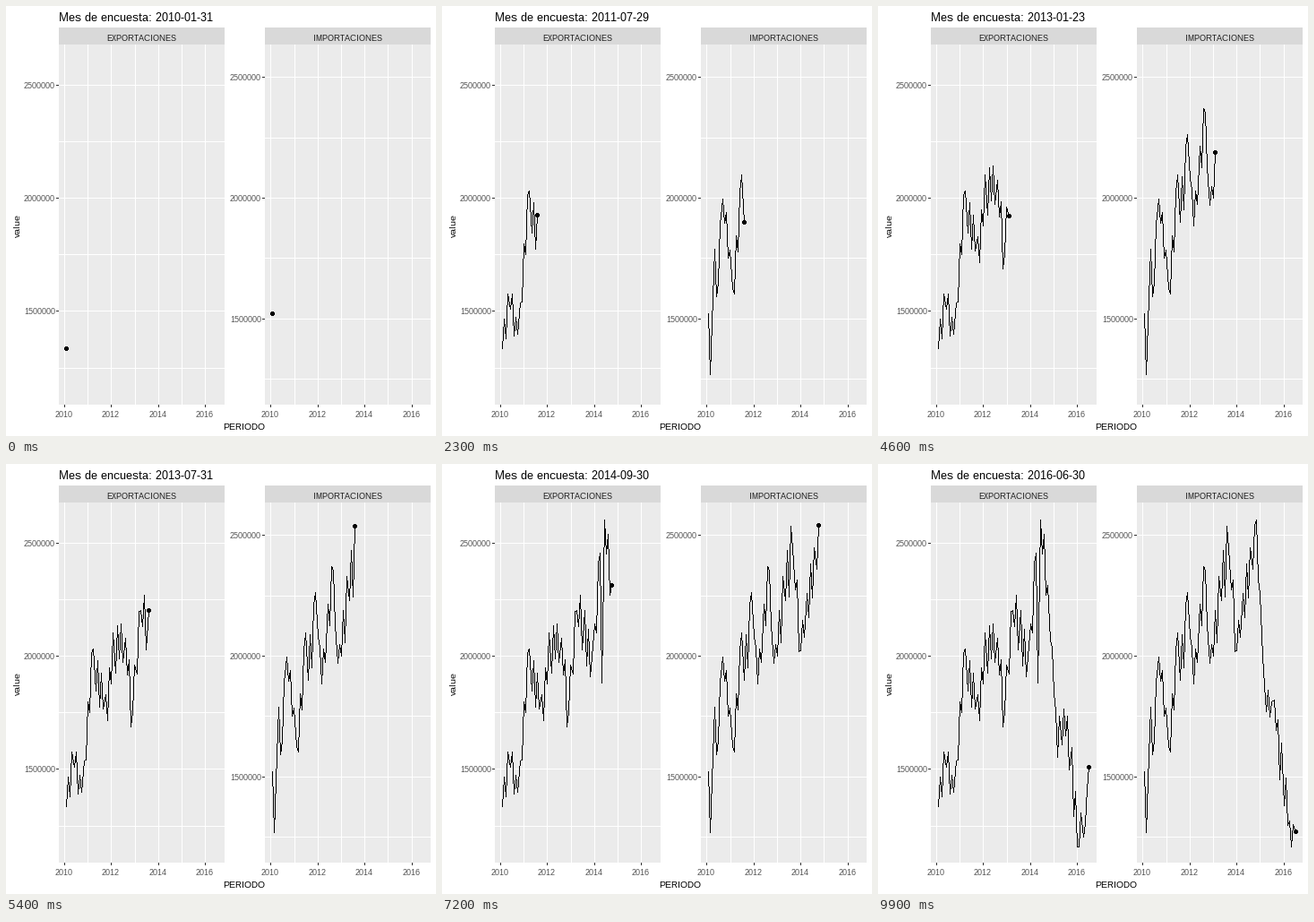
Recreate the animation shown at these times as a matplotlib script. Size 480x480 px, loop 10 s.

```python
import numpy as np
import matplotlib.pyplot as plt
from matplotlib.animation import FuncAnimation
from matplotlib.patches import Rectangle

SIZE, DPI = 480, 80
PX = 72 / DPI  # points per pixel
FRAMES, INTERVAL = 100, 100
TOP, BOTTOM, WIDTH = 43, 445, 185
MID_ROW = 214.5  # row of 2 000 000 in both panels

plt.rcParams.update({
    "font.family": "Liberation Sans",
    "text.hinting": "native",
    "text.hinting_factor": 1,
})

# Month-end dates, January 2010 to June 2016, as days since the first one
months = np.arange("2010-02", "2016-08", dtype="datetime64[M]")
dates = months.astype("datetime64[D]") - np.timedelta64(1, "D")
start = dates[0]
days = (dates - start).astype(int)
span = days[-1]
# Every observation is reached on a whole frame
keys = np.rint(days / span * (FRAMES - 1)).astype(int)

# Turning points: (month, thousands)
EXPORTS = [(0, 1335), (3, 1577), (8, 1399), (14, 2032), (19, 1767),
           (28, 2142), (34, 1755), (38, 2202), (46, 1996), (50, 2455),
           (51, 1881), (52, 2601), (58, 2040), (61, 1553), (64, 1767),
           (72, 1157), (75, 1260), (77, 1509)]
IMPORTS = [(0, 1521), (1, 1268), (3, 1788), (5, 1647), (7, 1996),
           (13, 1602), (17, 2097), (18, 1900), (22, 2264), (25, 1885),
           (31, 2357), (33, 1970), (43, 2446), (47, 2022), (57, 2565),
           (61, 1877), (64, 1747), (66, 1818), (75, 1209), (77, 1272)]


def monthly(turns, seed):
    """Trend through the turning points; months between overshoot in zigzag."""
    at, value = np.array(turns).T
    n = np.arange(len(days))
    seg = np.clip(np.searchsorted(at, n, "right") - 1, 0, len(at) - 2)
    swing = np.sign(value[seg + 1] - value[seg]) * np.where((n - at[seg]) % 2, 1, -1)
    swing[at] = 0
    noise = np.random.default_rng(seed).uniform(20, 140, len(n))
    return np.clip(np.interp(n, at, value) + swing * noise,
                   value.min(), value.max())


fig = plt.figure(figsize=(SIZE / DPI, SIZE / DPI), dpi=DPI, facecolor="white")
ax = fig.add_axes([0, 0, 1, 1])
ax.axis("off")
ink = np.zeros((SIZE, SIZE, 4), np.uint8)
layer = ax.imshow(ink, extent=(0, SIZE, SIZE, 0), aspect="auto",
                  interpolation="nearest", zorder=3)
ax.set_xlim(0, SIZE)
ax.set_ylim(SIZE, 0)


def box(x, y, w, h, color):
    ax.add_patch(Rectangle((x, y), w, h, fc=color, lw=0, antialiased=False))


def label(x, y, text, size, color="black", **kw):
    kw = {"ha": "center", "va": "baseline", **kw}
    return ax.text(x, y, text, fontsize=size * PX, color=color, **kw)


def stroke(xs, ys):
    """One-pixel hard-edged line through whole-pixel points."""
    for x0, y0, x1, y1 in zip(xs, ys, xs[1:], ys[1:]):
        n = max(abs(x1 - x0), abs(y1 - y0)) + 1
        cols = np.rint(np.linspace(x0, x1, n)).astype(int)
        rows = np.rint(np.linspace(y0, y1, n)).astype(int)
        ink[rows, cols, 3] = 255


def dot(x, y):
    dy, dx = np.mgrid[-2:3, -2:3]
    disc = dx**2 + dy**2 <= 5
    ink[y + dy[disc], x + dx[disc], 3] = 255


class Panel:
    def __init__(self, left, step, name, values):
        self.left, self.step = left, step
        self.x = self.col(days)
        self.y = self.row(values)

        edge = int(left)
        box(edge, 24, WIDTH, TOP - 24, "#D9D9D9")
        box(edge, TOP, WIDTH, BOTTOM - TOP, "#EBEBEB")
        label(edge + WIDTH / 2, 39, name, 9, "#1A1A1A")

        for value in range(1250, 2501, 250):
            row = int(self.row(value))
            box(edge, row, WIDTH, 1, "white")
            if value % 500 == 0:
                box(edge - 3, row, 3, 1, "#333333")
                label(edge - 4, row + 4, f"{value}000", 9, "#4D4D4D", ha="right")

        for year in range(2010, 2017):
            day = (np.datetime64(f"{year}-01-01") - start).astype(int)
            x = int(self.col(day))
            box(x, TOP, 1, BOTTOM - TOP, "white")
            if year % 2 == 0:
                box(x, BOTTOM, 1, 3, "#333333")
                label(x, 459, str(year), 9, "#4D4D4D")

    def col(self, day):
        return self.left + WIDTH * (1 / 22 + day / span / 1.1)

    def row(self, value):
        return MID_ROW - (value - 2000) / 500 * self.step

    def reveal(self, i):
        done = keys <= i
        xs = np.append(self.x[done], np.interp(i, keys, self.x)).astype(int)
        ys = np.append(self.y[done], np.interp(i, keys, self.y)).astype(int)
        stroke(xs, ys)
        dot(xs[-1], ys[-1])


panels = [
    Panel(59.1, 126.4, "EXPORTACIONES", monthly(EXPORTS, 3)),
    Panel(289.55, 134.6, "IMPORTACIONES", monthly(IMPORTS, 8)),
]
title = label(59, 17, "", 13, ha="left")
label(266, 473, "PERIODO", 10)
label(16, 245, "value", 10, rotation=90, rotation_mode="anchor")


def update(i):
    date = start + np.timedelta64(int(span * i // (FRAMES - 1)), "D")
    title.set_text(f"Mes de encuesta: {date}")
    ink[:] = 0
    for panel in panels:
        panel.reveal(i)
    layer.set_data(ink)
    return []


anim = FuncAnimation(fig, update, frames=FRAMES, interval=INTERVAL,
                     repeat=True, repeat_delay=0, blit=False)
plt.show()
```
